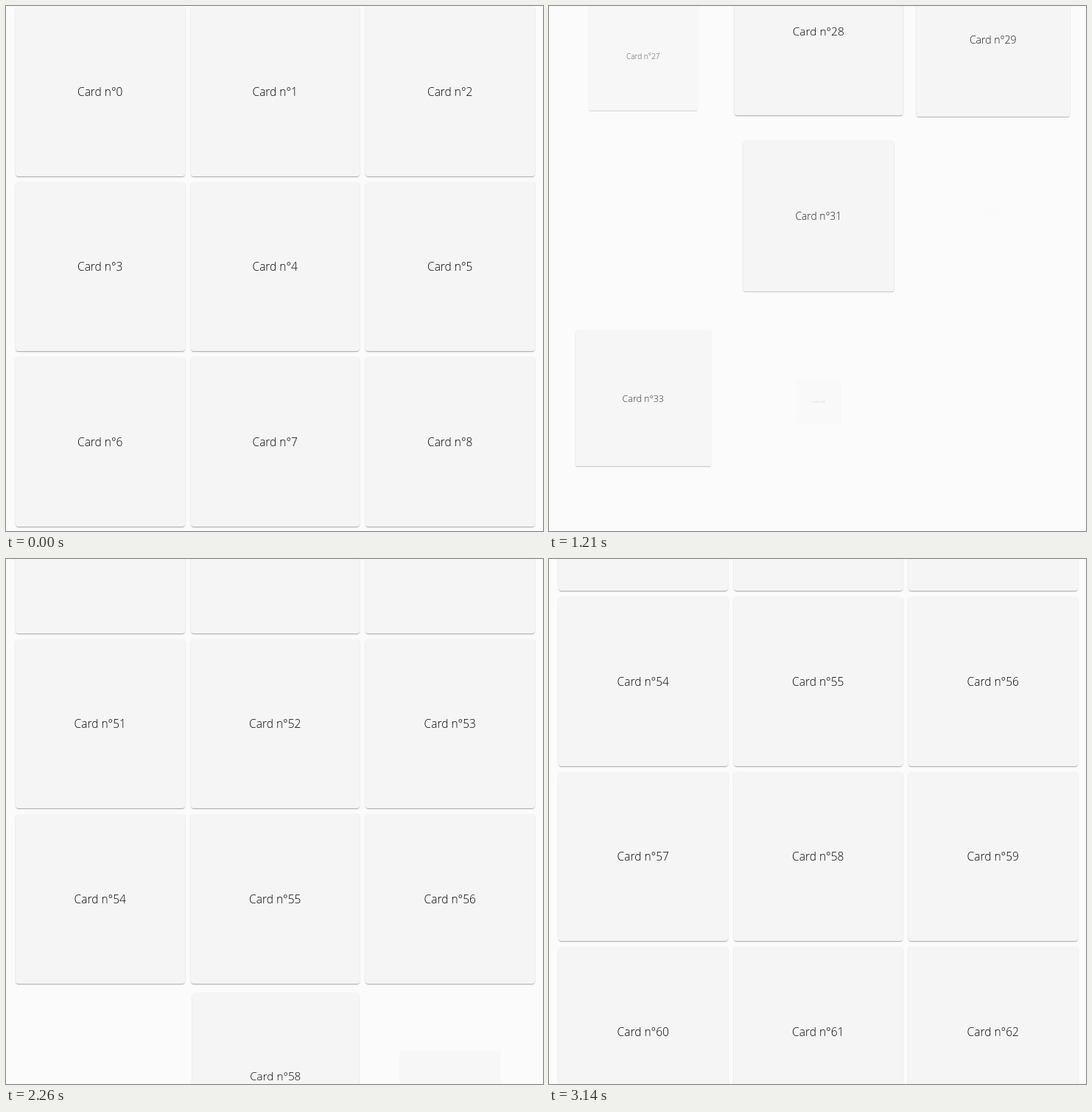
These frames come from a looping animation (729 by 712 pixels, 3.85 s). An HTML page:

```html
<!DOCTYPE html>
<html lang="en">
<head>
<meta charset="utf-8">
<title>Card grid</title>
<style>
  html, body { margin: 0; width: 100%; height: 100%; overflow: hidden; background: #fbfbfb; }
  #stage { position: absolute; left: 0; top: 0; width: 729px; height: 712px; overflow: hidden; }
  #grid { position: absolute; left: 0; top: 0; }
  .card {
    position: absolute; width: 229.5px; height: 229.5px;
    display: flex; align-items: center; justify-content: center;
    background: #f5f5f5; border-radius: 4px; color: #000;
    font: 300 15.5px "Open Sans", "Noto Sans", sans-serif; white-space: nowrap;
    box-shadow: 0 2px 1px -1px rgba(0, 0, 0, .16), 0 1px 1px rgba(0, 0, 0, .12), 0 1px 3px rgba(0, 0, 0, .1);
  }
  #cursor { position: absolute; left: 372px; top: 403px; }
</style>
</head>
<body>
<div id="stage">
  <div id="grid"></div>
  <svg id="cursor" width="14" height="20">
    <path d="M.5.5v16l3.7-3.5 2.4 5.4 2.3-1-2.4-5.3h5z" fill="#fff" stroke="#000"/>
  </svg>
</div>
<script>
const LOOP = 3850, STEP = 10;
const PITCH = 237.5, COLS = 3, COUNT = 63, READY = 15;
const VIEW = 712, AHEAD = 100;
const ENTER = 300, MAX_LAG = 340, RISE = 152;

// Scroll position: [ms, px], joined by a monotone cubic
const path = [[470, 0], [730, 295], [920, 1180], [1210, 2221],
  [2010, 3715], [2430, 4029.5], [2790, 4167], [3140, 4225]];
const pauses = [[920, 1020], [2010, 2110]];

const slope = i => (path[i + 1][1] - path[i][1]) / (path[i + 1][0] - path[i][0]);
const tangents = path.map((p, i) => {
  if (i === 0 || i === path.length - 1) return 0;
  const a = slope(i - 1), b = slope(i);
  return 2 * a * b / (a + b);
});

function scrollAt(t) {
  const last = path.length - 1;
  if (t <= path[0][0]) return 0;
  if (t >= path[last][0]) return path[last][1];
  const i = path.findIndex(p => p[0] > t) - 1;
  const [t0, y0] = path[i], [t1, y1] = path[i + 1];
  const d = t1 - t0, u = (t - t0) / d, v = 1 - u;
  return v * v * ((1 + 2 * u) * y0 + u * d * tangents[i]) +
    u * u * ((3 - 2 * u) * y1 - v * d * tangents[i + 1]);
}

// Moment at which a row comes close to the lower edge
function reachTime(row) {
  let t = 0;
  while (t < LOOP && scrollAt(t) + VIEW + AHEAD < row * PITCH) t += 2;
  return t;
}

// Uneven stagger, mostly short
const lag = i => MAX_LAG * ((i * 11 / 27 + 0.7) % 1) ** 2;

const grid = document.getElementById("grid");
const cursor = document.getElementById("cursor");

const cards = Array.from({ length: COUNT }, (_, i) => {
  const row = Math.floor(i / COLS), col = i % COLS;
  const el = document.createElement("div");
  el.className = "card";
  el.textContent = "Card n°" + i;
  el.style.left = 13 + PITCH * col + "px";
  el.style.top = 1 + PITCH * row + "px";
  grid.append(el);
  return { style: el.style, start: i < READY ? -ENTER : reachTime(row) + lag(i) };
});

function poseCard({ style, start }, t) {
  const u = Math.min(1, (t - start) / ENTER);
  style.visibility = u > 0 ? "visible" : "hidden";
  if (u <= 0) return;
  const s = 1 - (1 - u) ** 3;
  style.opacity = s;
  style.transform = u < 1 ? `scale(${s}) translateY(${RISE * (1 - s)}px)` : "none";
}

function draw(t) {
  for (const [from, to] of pauses) if (t >= from && t < to) t = from;
  grid.style.transform = `translateY(${-Math.round(scrollAt(t))}px)`;
  cards.forEach(card => poseCard(card, t));
  cursor.style.visibility = t >= 650 && t < 850 ? "visible" : "hidden";
}

const begin = performance.now();
function tick() {
  const t = (performance.now() - begin) % LOOP;
  draw(Math.floor(t / STEP) * STEP);
  requestAnimationFrame(tick);
}
tick();
</script>
</body>
</html>
```
